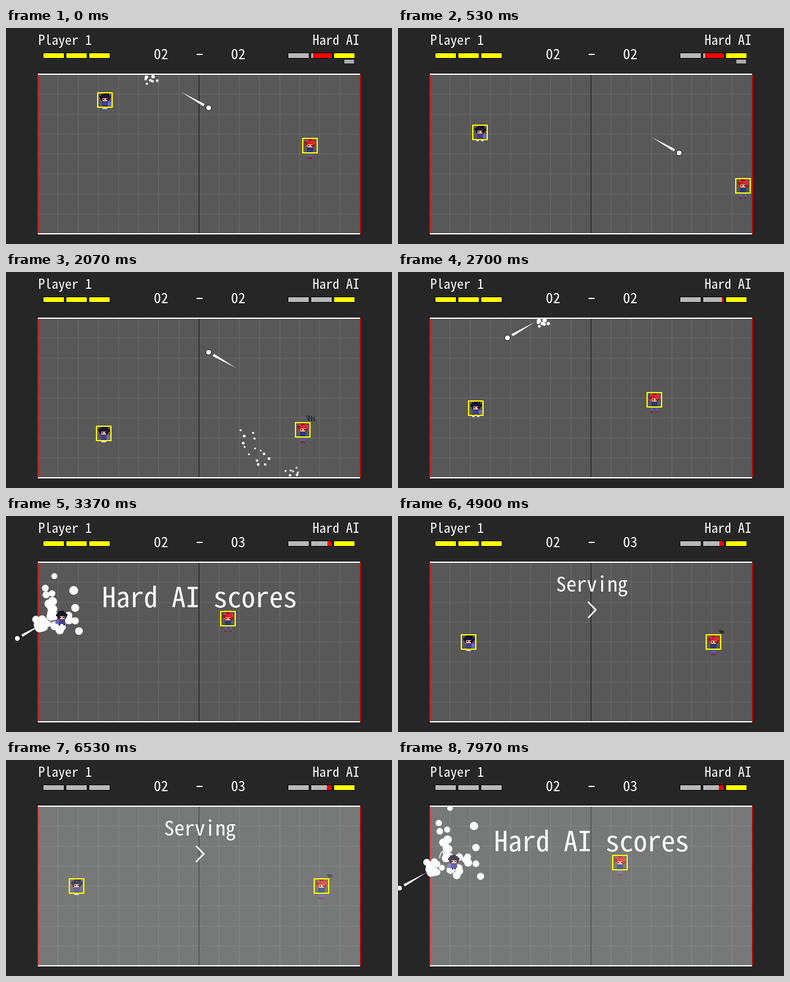
These frames come from a looping animation (640x360 px, 8000 ms). An HTML page with a canvas:

```html
<!DOCTYPE html>
<html lang="en">
<head>
<meta charset="utf-8">
<title>Court duel</title>
<style>
html, body { margin: 0; width: 100%; height: 100%; overflow: hidden; background: #262626; }
svg, canvas { position: absolute; left: 0; top: 0; width: 100%; height: 100%; display: block; }
text { font-family: "Noto Sans Mono CJK JP", "Noto Sans CJK JP", "Noto Sans CJK", monospace; fill: #fff; white-space: pre; }
.name { font-size: 22.2px; }
.score { font-size: 24px; text-anchor: middle; }
.msg { text-anchor: middle; }
</style>
</head>
<body>
<svg viewBox="0 0 640 360">
  <rect x="53" y="77" width="534" height="266" fill="#585858"/>
  <g id="grid" stroke="#626262" stroke-width="2"></g>
  <path d="M320 77V343" stroke="#333" stroke-width="2"/>
  <path d="M53 77V343M587 77V343" stroke="#f00" stroke-width="2"/>
  <path d="M53 77H587M53 343H587" stroke="#fff" stroke-width="2"/>
  <text class="name" x="53.5" y="28">Player 1</text>
  <text class="name" x="586" y="28" text-anchor="end">Hard AI</text>
  <text class="score" x="257" y="52">02</text>
  <path d="M316 44H326" stroke="#fff" stroke-width="2"/>
  <text class="score" id="right" x="385" y="52">02</text>
</svg>
<canvas id="stage" width="640" height="360"></canvas>
<svg viewBox="0 0 640 360">
  <text class="msg" id="scored" x="321" y="152" font-size="46.2">Hard AI scores</text>
  <g id="serving">
    <text class="msg" x="321.5" y="126" font-size="34">Serving</text>
    <path d="M315 143L328 156.5L315 170" fill="none" stroke="#fff" stroke-width="2.6"/>
  </g>
</svg>
<script>
const $ = id => document.getElementById(id);
const g = $('stage').getContext('2d');

let lines = '';
for (let i = 1; i < 16; i++) if (i !== 8) lines += `M${Math.round(53 + i * 33.375)} 78V342`;
for (let i = 1; i < 8; i++) lines += `M54 ${Math.round(77 + i * 33.25)}H586`;
$('grid').innerHTML = `<path d="${lines}"/>`;

// Times are in ms, speeds in px per ms.
const LOOP = 8000, STEP = 100 / 3;
const VX = 0.244, SLOPE = 0.579, SPEED = 0.282;
const CHARGE = 790, HIT = 1038, FLOOR = 1492, POP = 1705, CEILING = 2465, GOAL = 3230;
const RESET = 4195, READY = 4330, SERVE = 5065, CAST = 5430, REWIND = 5960;

// Key points of each run: time, x, y.
const playerRun = [[0, 164, 120], [400, 135, 160], [830, 137, 205], [1167, 174, 226], [2067, 162, 269], [2450, 147, 256], [3200, 93, 170]];
const aiRun = [[0, 504, 196], [500, 572, 263], [1600, 572, 263], [2067, 492, 263], [GOAL, 368, 171]];
const playerServe = [[SERVE, 117, 210], [CAST, 64, 210]];
const aiServe = [[SERVE, 523, 210], [CAST, 492, 232]];

const clamp = (v, lo, hi) => Math.min(hi, Math.max(lo, v));
const random = n => { const v = Math.sin(n * 12.9898) * 43758.5453; return v - Math.floor(v); };

function along(path, t) {
  let i = 0;
  while (i < path.length - 2 && t >= path[i + 1][0]) i++;
  const [t0, x0, y0] = path[i], [t1, x1, y1] = path[i + 1];
  const k = clamp((t - t0) / (t1 - t0), 0, 1);
  return [Math.round(x0 + (x1 - x0) * k), Math.round(y0 + (y1 - y0) * k)];
}

// Reflects y between the top and bottom walls.
function fold(y) {
  if (y < 77) return 154 - y;
  return y > 343 ? 686 - y : y;
}

const incoming = t => [336 + VX * t, fold(133 + VX * SLOPE * t)];
const served = t => [320 + VX * (t - SERVE), 210 + VX * SLOPE * (t - SERVE)];
const shot = dir => t => {
  const d = t - HIT;
  return dir ? [587 - VX * d, fold(279 + dir * VX * SLOPE * d)] : [587 - SPEED * d, 279];
};

function dot(x, y, r, color = '#fff') {
  g.fillStyle = color;
  g.beginPath();
  g.arc(x, y, r, 0, 7);
  g.fill();
}

function rect(color, ...box) {
  g.fillStyle = color;
  g.fillRect(...box);
}

function ball(pos, t, start) {
  const from = Math.max(start, t - 182), span = t - 34 - from, n = 14;
  g.strokeStyle = '#fff';
  for (let i = 0; i < n && span > 0; i++) {
    g.lineWidth = 0.3 + 4 * i / n;
    g.beginPath();
    g.moveTo(...pos(from + span * i / n));
    g.lineTo(...pos(from + span * (i + 1.2) / n));
    g.stroke();
  }
  const [x, y] = pos(t);
  dot(x, y, 5, '#111');
  dot(x, y, 4);
}

// Puffs fly out around an angle, slow down and shrink away.
function burst(age, x, y, { n = 7, dir = 0, fan = 6.28, reach = 24, size = 4, life = 900, seed = 1 }) {
  if (age < 0 || age >= life) return;
  const spread = 1 - Math.exp(-age / 150);
  for (let i = 0; i < n; i++) {
    const a = dir + fan * ((i + random(seed + i)) / n - 0.5);
    const far = 0.25 + 0.75 * random(seed + i + 50);
    const d = reach * far * spread;
    const r = size * (1.15 - 0.6 * far * random(seed + i + 90)) * (1 - 0.8 * age / life);
    dot(x + d * Math.cos(a), y + d * Math.sin(a), r);
  }
}

const UP = -Math.PI / 2;
function bursts(s) {
  const bounce = { fan: 2.4, reach: 20, size: 4 };
  burst(s + 398, 239, 77, { ...bounce, dir: -UP });
  burst(s - FLOOR, 476, 343, { ...bounce, dir: UP });
  burst(s - POP, 400, 279, { size: 3 });
  burst(s - POP, 424, 313, { size: 3, reach: 28, seed: 5 });
  burst(s - CEILING, 239, 77, { ...bounce, dir: -UP });
  if (s < RESET) {
    burst(s - GOAL, 58, 180, { n: 9, reach: 22, size: 8 });
    burst(s - GOAL, 55, 183, { n: 24, dir: -0.6, fan: 1.7, reach: 160, size: 7.5, seed: 3 });
  }
}

const girl = { hair: ['#9c141c', '#ee3038', '#d8242c'], coat: '#2c3874', legs: '#4c64b4', shoes: '#8c2434', head: -4, foot: 22 };
const swordsman = { hair: ['#17122c', '#241a44', '#120e20'], coat: '#413e8c', legs: '#17122c', shoes: '#d4d6ec', head: -5, foot: 15 };

// Small figure: ragged hair, face, coat and two swinging legs.
function figure({ hair, coat, legs, shoes, head, foot }, x, y, step, flip, cape) {
  g.save();
  g.translate(x, y);
  g.scale(flip, 1);
  for (let i = 0; i < 60; i++) {
    const a = i * 2.4, d = 8 * Math.sqrt(i / 60);
    rect(hair[Math.floor(random(i) * 3)], Math.round(d * Math.cos(a)) - 1, Math.round(head + 0.8 * d * Math.sin(a)) - 1, 3, 3);
  }
  rect(coat, -5, head + 7, 10, 8);
  if (cape) rect('#6c6abc', 5, 3, 6, 7);
  rect('#f0b890', -4, head + 2, 8, 5);
  for (const eye of [-3, 2]) rect('#281c2c', eye, head + 3, 2, 2);
  for (const side of [-1, 1]) {
    const lx = side * (2 + 2 * step) - 1;
    rect(legs, lx, head + 15, 3, foot - head - 15);
    rect(shoes, lx - 1, foot - 3, 4, 3);
  }
  g.restore();
}

function scribble(x, y, size) {
  g.strokeStyle = '#181818';
  g.lineWidth = 1;
  g.beginPath();
  for (let i = 0; i < 7; i++) g.lineTo(x + size * (i / 6 + (i % 2) / 4), y + size * (i % 2 ? 0.7 : 0.2 * random(i)));
  g.stroke();
}

function frame(x, y, half, color) {
  g.strokeStyle = color;
  g.lineWidth = 2;
  g.strokeRect(x - half, y - half, 2 * half, 2 * half);
}

function meter(x, level, fromRight) {
  for (let i = 0; i < 3; i++) {
    const left = x + 38 * i, fill = Math.floor(clamp(level - 34 * (fromRight ? 2 - i : i), 0, 34));
    rect('#000', left, 41, 36, 10);
    rect('#b8b8b8', left + 1, 42, 34, 8);
    rect(fill < 34 ? '#f00' : '#ff0', fromRight ? left + 35 - fill : left + 1, 42, fill, 8);
  }
}

function aiEnergy(t) {
  if (t < CHARGE) return 65;
  const k = clamp((t - HIT) / (GOAL - HIT), 0, 1);
  return 33 + 8 * k * k + 1.5 * clamp((t - SERVE) / (CAST - SERVE), 0, 1);
}

function swing(x, y, k) {
  g.strokeStyle = '#fff';
  g.lineWidth = 1.5;
  g.beginPath();
  g.arc(x - 6, y - 6, 18, Math.PI, Math.PI + 0.4 + 1.2 * k);
  g.stroke();
}

// Draws both figures and returns a function that draws their boxes.
function players(s) {
  const serve = s >= RESET, idle = s >= READY && s < SERVE;
  const down = s >= GOAL - 50 && !serve, power = s >= CHARGE && s < 1300;
  const step = idle ? 0 : Math.floor(s / 100) % 2;
  const [px, py] = along(serve ? playerServe : playerRun, s);
  const [ax, ay] = along(serve ? aiServe : aiRun, s);

  figure(swordsman, px, py, step, down ? -1 : 1, !idle || s >= 4900);
  figure(girl, ax, ay, step, power ? -1 : 1);
  if (down) swing(px, py, clamp((s - GOAL) / 200, 0, 1));
  if (s > 1950 && s < 2250) scribble(ax + 5, ay - 24, 14);
  if (serve) scribble(ax + 9, ay - 20, 8);

  return () => {
    if (!down) frame(px, py, 12, '#ff0');
    frame(ax, ay, power ? 21 : 12, power ? '#0f0' : '#ff0');
  };
}

function balls(s) {
  if (s < HIT) ball(incoming, s, -1000);
  else if (s < RESET) for (const dir of s < POP ? [-1, 0, 1] : [-1]) ball(shot(dir), s, HIT);
  else if (s >= SERVE) ball(served, s, SERVE);
}

function draw(now) {
  const t = Math.floor((now % LOOP + 5) / STEP) * STEP;
  const back = t >= REWIND;
  const s = back ? 11400 - t : Math.min(t, CAST);

  g.clearRect(0, 0, 640, 360);
  meter(61, t < CAST - 5 ? 102 : 0, false);
  meter(467, aiEnergy(t), true);
  if (t < CHARGE) {
    rect('#b8b8b8', 561, 53, 16, 6);
    for (let x = 563; x < 576; x += 3) rect('#777', x, 55, 1, 2);
  }

  bursts(s);
  const boxes = players(s);
  if (back) rect('rgba(245,255,248,.2)', 53, 77, 534, 266);
  boxes();
  balls(s);

  $('right').textContent = t < GOAL ? '02' : '03';
  $('scored').style.display = s >= GOAL && s < RESET ? '' : 'none';
  $('serving').style.display = s >= RESET && s < SERVE ? '' : 'none';
}

function tick() {
  draw(performance.now());
  requestAnimationFrame(tick);
}
tick();
</script>
</body>
</html>
```
